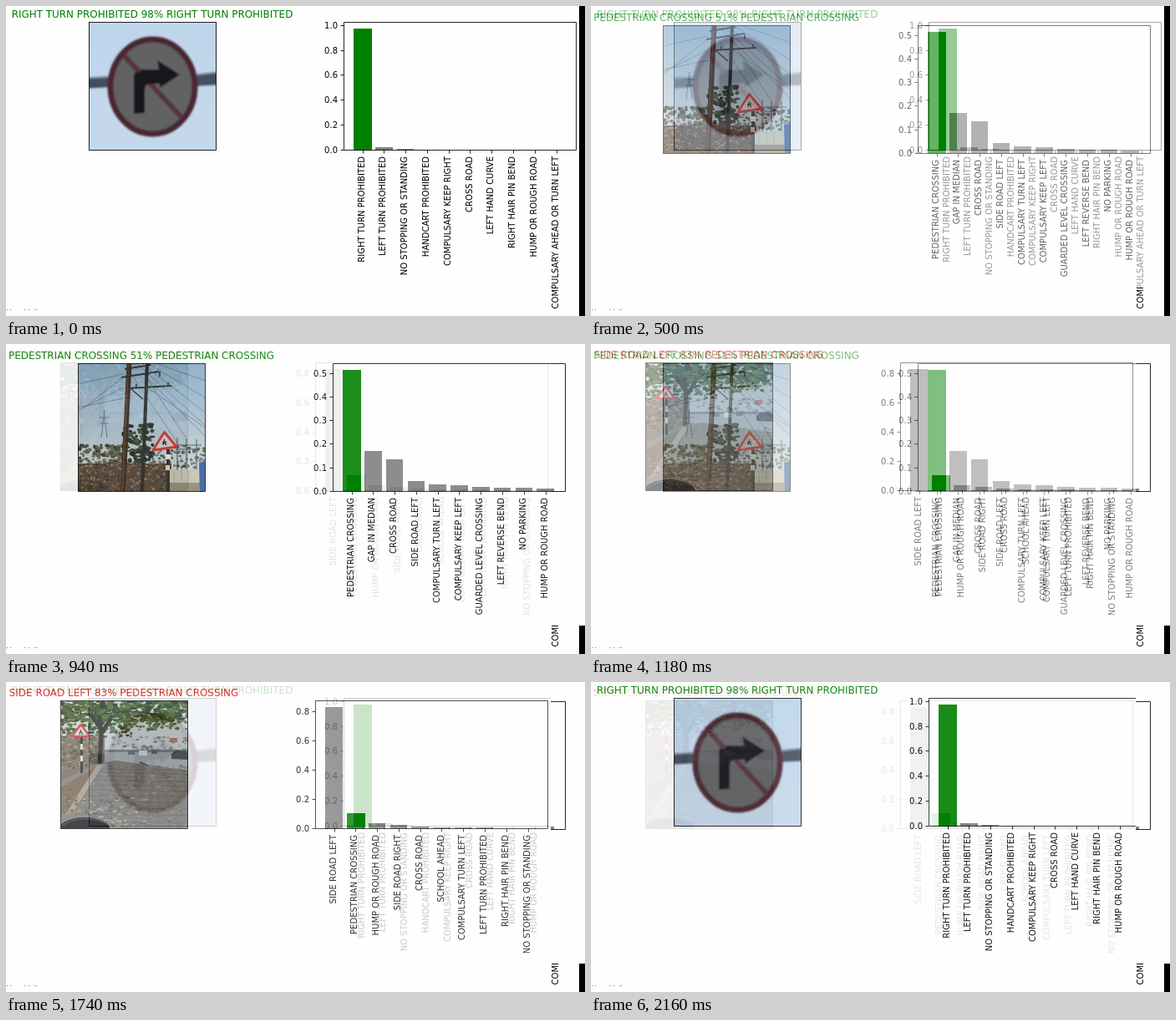
Write an HTML page that moves like this. It is 693x371 px and loops after 2.22 s.

```html
<!DOCTYPE html>
<html lang="en">
<head>
<meta charset="utf-8">
<title>Traffic sign predictions</title>
<style>
html, body { margin: 0; width: 100%; height: 100%; overflow: hidden; background: #fefefe; }
svg { display: block; width: 693px; height: 371px; font: 10px "DejaVu Sans", Verdana, sans-serif; }
.title { font-size: 11.95px; text-anchor: middle; }
.label { text-anchor: end; }
.axis { fill: none; stroke: #000; stroke-width: .85; }
</style>
</head>
<body>
<div id="stage"></div>
<script>
const HOLD = 200, STEP = 60, PART = 740, LOOP = 3 * PART;
const PLOT_W = 278, PLOT_H = 153, PHOTO_W = 152;
const GAP = PLOT_W / 10.78;

let seed = 7;
function rnd(a = 0, b = 1) {
  seed = (seed * 16807) % 2147483647;
  return +(a + (b - a) * seed / 2147483647).toFixed(1);
}

const rect = (x, y, w, h, fill, extra = "") =>
  `<rect x="${x}" y="${y}" width="${w}" height="${h}" fill="${fill}" ${extra}/>`;
const path = (d, fill, extra = "") => `<path d="${d}" fill="${fill}" ${extra}/>`;
const line = (d, color, w, extra = "") =>
  path(d, "none", `stroke="${color}" stroke-width="${w}" ${extra}`);
const text = (x, y, s, extra = "") => `<text x="${x}" y="${y}" ${extra}>${s}</text>`;
const snap = v => Math.round(v) + .5;

// Soft random dabs inside a box
function dabs(n, x0, y0, x1, y1, colors, rx, ry = rx) {
  let out = "";
  for (let i = 0; i < n; i++) {
    const color = colors[i % colors.length];
    out += `<ellipse cx="${rnd(x0, x1)}" cy="${rnd(y0, y1)}" rx="${rnd(rx * .4, rx)}" ry="${rnd(ry * .4, ry)}" fill="${color}"/>`;
  }
  return out;
}

function signPhoto() {
  return rect(95, 15, 160, 162, "url(#skyA)") +
    `<g filter="url(#soft)">` +
    path("M90 86L126 84V97L90 99Z", "#414d5c") +
    path("M224 82L260 78V94L224 96Z", "#46505f") +
    line("M92 87L126 85M226 83L258 79", "#7b8da2", 1.5) +
    `<ellipse cx="175.5" cy="96.5" rx="50.5" ry="56.5" fill="#626265" stroke="#4a2832" stroke-width="7"/>` +
    line("M141 59L211 134", "#57303a", 6) +
    path("M153 129V85Q153 76 162 76H183L181 65L208 82L184 98V93H173Q166 93 166 100V128Z", "#14181e") +
    line("M144 62L160 79", "#57303a", 5) +
    `</g>`;
}

function crossingPhoto() {
  const wires = [0, 5, 11, 18, 26].map(d => `M${150 + d} 22L240 ${112 - d * 2.6}`).join("");
  const left = [0, 1, 2].map(i => `M86 ${76 + i * 3}L141 ${65 - i * 13}`).join("");
  return rect(84, 21, 158, 158, "url(#skyB)") +
    line(wires + left, "#4f6373", .6) +
    line("M166 50L238 100M168 40L215 112M146 30L205 118M140 36L86 48", "#4f6373", .6) +
    line("M118 79L114 112M117 79L121 112M112 88H124M113 95H123", "#5b6f80", .9) +
    dabs(120, 86, 121, 142, 146, ["#43503a", "#5d6048", "#333d2c", "#6a6850"], 3.2, 2.6) +
    dabs(150, 140, 96, 176, 148, ["#27302a", "#364231", "#455039", "#222a23"], 3.6, 3) +
    dabs(70, 174, 122, 238, 148, ["#59634f", "#404b39", "#727a6b"], 2.6, 2.2) +
    rect(86, 143, 112, 35, "#55463a") +
    dabs(320, 86, 137, 192, 177, ["#79604a", "#3a3229", "#8d7459", "#525038", "#48362b", "#98815f"], 2, 1.5) +
    rect(196, 150, 36, 19, "#c4c1af") + rect(196, 166, 40, 12, "#8d8775") +
    line("M201 151V167M210 151V167M219 151V167", "#98988d", .7) +
    path("M231 142L240 140V178H232Z", "#315f9b") +
    line("M205 112V151M216 113V150M228 114V150M202 121H234M203 126H232", "#4a5150", 1.1) +
    line("M147.5 22L140 178", "#3c2a25", 6) + line("M146.5 22L139 178", "#5d3f33", 2) +
    line("M169 22L163 178", "#2d2c2b", 4) +
    line("M138 40L183 33M146 53L198 50M142 30L173 25", "#343134", 2) +
    line("M150 54L164 66M184 33V39M194 50V46M156 53V48", "#2b2a2d", 1.5) +
    rect(192, 126, 4, 52, "#302f2b") + rect(190.5, 132, 7, 6, "#e7e3d7") + rect(191, 145, 5, 6, "#d3cec0") +
    path("M189.5 105.5L176 127L204 123Z", "#cfcac5", `stroke="#c93637" stroke-width="2.8" stroke-linejoin="round"`) +
    line("M189.5 114L188 121M189 117L192 121M187 118L192 117", "#252323", 1.3);
}

function pavementPhoto() {
  let joints = "";
  for (let y = 104, gap = 4; y < 178; y += gap, gap += .5)
    joints += `M${112 - (y - 100) * .5} ${y}L220 ${y + 2}`;
  let cross = "";
  for (let i = 0; i < 14; i++) cross += `M${120 + i * 8} 100L${70 + i * 14} 178`;
  return rect(63, 20, 158, 158, "#c7cfd2") +
    dabs(70, 126, 66, 218, 82, ["#8b9990", "#a5acad", "#c9cfd0", "#748174"], 3, 2) +
    rect(118, 83, 102, 22, "#a8b0b6") + rect(118, 81, 102, 3, "#7c8587") +
    rect(63, 65, 55, 63, "#75695c") +
    dabs(110, 65, 64, 112, 104, ["#514d3c", "#8d7c69", "#626249", "#a18f77"], 3, 2) +
    path("M63 120L108 98L132 94L220 106V178H63Z", "#7d7a73") +
    line(joints, "#696763", .8) + line(cross, "#73706a", .6) +
    dabs(300, 100, 100, 217, 175, ["#65635d", "#97938a", "#716e68", "#8b877f"], 3, 1.1) +
    dabs(60, 85, 138, 170, 174, ["#a39a88", "#b1a793", "#615d57"], 3.5, 1.6) +
    path("M63 128L108 101L110 106L82 150L63 163Z", "#746451") +
    path("M109 99L117 100L83 153L70 160Z", "#a0988a") +
    line("M116 101L83 153", "#5d5a55", 1) +
    dabs(40, 65, 125, 86, 160, ["#8d7d67", "#65584a", "#7b6d59"], 3, 1.5) +
    dabs(360, 63, 20, 220, 47, ["#33451f", "#48612b", "#28371d", "#587036", "#3d5528"], 5, 3.2) +
    dabs(130, 63, 44, 150, 66, ["#465a2c", "#354724", "#66784a"], 3.2, 2.4) +
    dabs(60, 148, 46, 218, 58, ["#4b602f", "#617443"], 3, 2) +
    dabs(70, 70, 24, 214, 54, ["#a9b98b", "#c5d0b6", "#819853"], 1.2, .8) +
    line("M112 98L114 62L112 40M114 62L126 43M113 55L101 38", "#383024", 5) +
    line("M120 38Q150 32 180 39M105 35Q92 28 78 30", "#382f25", 1.5) +
    path("M198 92V86L203 82H214L219 85V93Z", "#454b51") +
    rect(146, 82, 8, 5, "#69717a") + rect(159, 82, 10, 6, "#e2e5e6") + rect(174, 81, 7, 5, "#626b70") +
    rect(196, 67, 9, 5, "#ba6c63") +
    line("M160 96L170 100", "#5d5c55", 2) +
    rect(89, 65, 3, 44, "#292a28") + rect(89, 74, 3, 7, "#d6d2c8") + rect(89, 88, 3, 7, "#d6d2c8") +
    path("M89.5 51L79 65H100Z", "#ded8d0", `stroke="#c83b40" stroke-width="2.5" stroke-linejoin="round"`) +
    line("M89.5 57L88 63M90 59L92 63", "#2a2927", 1.3) +
    `<ellipse cx="94" cy="177" rx="31" ry="15" fill="#15181d"/>` +
    line("M67 172Q91 157 120 169", "#40454b", 1.3);
}

// Bars sit on whole pixels; an outlined bar is snapped to pixel centres
function bar(cx, bottom, h, outlined) {
  const off = outlined ? .5 : 0;
  const left = Math.round(cx - GAP * .4) + off, right = Math.round(cx + GAP * .4) + off;
  const top = Math.round(bottom - h) + off;
  const color = outlined ? "green" : "gray";
  return rect(left, top, right - left, Math.max(0, bottom - top), color, outlined ? `stroke="green"` : "");
}

function chart({ x, y, bars, labels, ticks, hit }) {
  const bottom = y + PLOT_H, scale = PLOT_H / (bars[0] * 1.05);
  let out = "", marks = "";
  labels.forEach((name, i) => {
    const cx = x - .9 + GAP * (.89 + i);
    out += bar(cx, bottom, bars[i] * scale || 0, i === hit);
    marks += `M${snap(cx)} ${bottom}v4`;
    out += text(0, 0, name, `class="label" transform="translate(${Math.round(cx + 2.1)} ${bottom + 7.5}) rotate(-90)"`);
  });
  ticks.forEach(v => {
    const ty = Math.floor(bottom - v * scale) + .5;
    marks += `M${x} ${ty}h-4`;
    out += text(x - 7.5, ty + 3.5, v.toFixed(1), `class="label"`);
  });
  return out + path(`M${x} ${y}h${PLOT_W}v${PLOT_H}h${-PLOT_W}Z${marks}`, "none", `class="axis"`);
}

function scene(s) {
  const box = `x="${s.px}" y="${s.y}" width="${PHOTO_W}" height="${PLOT_H}"`;
  return `<clipPath id="photo-${s.id}"><rect ${box}/></clipPath><g id="${s.id}">` +
    rect(0, 0, 693, 371, "#fefefe") +
    `<g clip-path="url(#photo-${s.id})">${s.photo()}</g><rect ${box} class="axis"/>` +
    text(s.px + PHOTO_W / 2 - .5, s.base, s.title, `class="title" fill="${s.color}"`) +
    chart(s) + (s.extra || "") + "</g>";
}

const specks = [1, 5, 22, 27, 34, 36].map(x => rect(x, 363, 1, 1, "#777")).join("");

const scenes = [{
  id: "a", px: 99.5, x: 404.5, y: 19.5, base: 14, color: "green", hit: 0, photo: signPhoto,
  title: "RIGHT TURN PROHIBITED 98% RIGHT TURN PROHIBITED",
  bars: [.976, .022, .007, .002], ticks: [0, .2, .4, .6, .8, 1],
  labels: ["RIGHT TURN PROHIBITED", "LEFT TURN PROHIBITED", "NO STOPPING OR STANDING",
    "HANDCART PROHIBITED", "COMPULSARY KEEP RIGHT", "CROSS ROAD", "LEFT HAND CURVE",
    "RIGHT HAIR PIN BEND", "HUMP OR ROUGH ROAD", "COMPULSARY AHEAD OR TURN LEFT"],
  extra: rect(686, 0, 7, 371, "#000") + specks
}, {
  id: "b", px: 86.5, x: 391.5, y: 23.5, base: 18, color: "green", hit: 0, photo: crossingPhoto,
  title: "PEDESTRIAN CROSSING 51% PEDESTRIAN CROSSING",
  bars: [.515, .171, .136, .043, .029, .026, .021, .015, .015, .014], ticks: [0, .1, .2, .3, .4, .5],
  labels: ["PEDESTRIAN CROSSING", "GAP IN MEDIAN", "CROSS ROAD", "SIDE ROAD LEFT",
    "COMPULSARY TURN LEFT", "COMPULSARY KEEP LEFT", "GUARDED LEVEL CROSSING",
    "LEFT REVERSE BEND", "NO PARKING", "HUMP OR ROUGH ROAD"]
}, {
  id: "c", px: 65.5, x: 370.5, y: 22.5, base: 17, color: "#dc0808", hit: 1, photo: pavementPhoto,
  title: "SIDE ROAD LEFT 83% PEDESTRIAN CROSSING",
  bars: [.83, .103, .035, .025, .013, .008, .007, .006, .002, .001], ticks: [0, .2, .4, .6, .8],
  labels: ["SIDE ROAD LEFT", "PEDESTRIAN CROSSING", "HUMP OR ROUGH ROAD", "SIDE ROAD RIGHT",
    "CROSS ROAD", "SCHOOL AHEAD", "COMPULSARY TURN LEFT", "LEFT TURN PROHIBITED",
    "RIGHT HAIR PIN BEND", "NO STOPPING OR STANDING"]
}];

const gradient = (id, top, low) =>
  `<linearGradient id="${id}" x2="0" y2="1"><stop stop-color="${top}"/><stop offset=".75" stop-color="${low}"/></linearGradient>`;
const clip = (id, x0, y0, x1, y1) =>
  `<clipPath id="${id}">${rect(x0, y0, x1 - x0, y1 - y0, "#000")}</clipPath>`;
const layer = (id, area) => `<g clip-path="url(#${area})"><use class="fade" href="#${id}"/></g>`;

document.getElementById("stage").innerHTML = `<svg viewBox="0 0 693 371"><defs>
  ${gradient("skyA", "#bdd4eb", "#c5d8eb")}${gradient("skyB", "#86a9c6", "#bfccd2")}
  <filter id="soft"><feGaussianBlur stdDeviation="1.1"/></filter>
  ${clip("inner", 4, 4, 683, 337)}${clip("wide", 0, 0, 693, 337)}
  ${clip("left", 4, 8, 652, 324)}${clip("last", 5, 5, 652, 324)}
  ${scenes.map(scene).join("")}</defs>
  <use href="#a"/>${layer("b", "inner")}${layer("c", "left")}${layer("a", "last")}</svg>`;

const fades = [...document.querySelectorAll(".fade")];

function draw(time) {
  const t = time % LOOP;
  fades.forEach((el, i) => {
    const u = t - i * PART;
    const k = u < HOLD ? 0 : Math.min(10, Math.floor((u - HOLD) / STEP) + 1);
    el.setAttribute("opacity", k / 10);
    el.setAttribute("visibility", k ? "visible" : "hidden");
  });
  // Once fully shown, the second scene also covers the margins
  fades[0].parentNode.setAttribute("clip-path", `url(#${t < PART ? "inner" : "wide"})`);
}

function tick() {
  draw(performance.now());
  requestAnimationFrame(tick);
}
tick();
</script>
</body>
</html>
```
